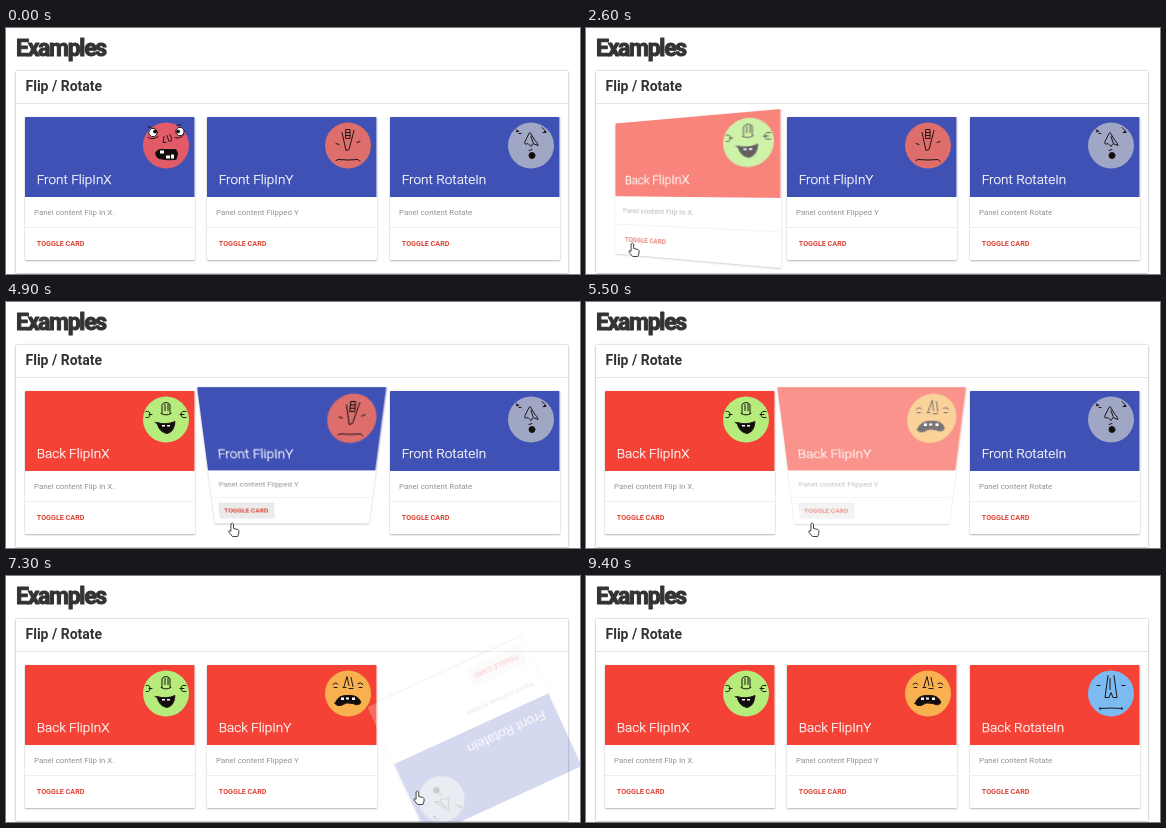
These frames come from a looping animation (574 px wide and 246 px high, 10000 ms). An HTML page:

```html
<!DOCTYPE html>
<html lang="en">
<head>
<meta charset="utf-8">
<title>Flip / Rotate</title>
<style>
  html, body { margin: 0; width: 100%; height: 100%; overflow: hidden; background: #fff; }
  body { position: relative; font-family: Roboto, sans-serif; }
  svg { position: absolute; left: 0; top: 0; overflow: visible; }
  .panel {
    position: absolute; left: 10px; top: 43px; width: 552px; height: 202px;
    background: #fff; box-shadow: 0 0 2px rgba(0,0,0,.28), 0 1px 2px rgba(0,0,0,.16);
  }
  .face {
    position: absolute; top: 89px; width: 169.5px; height: 143px;
    background: #fff; border-radius: 1px;
    box-shadow: 0 1px 2px rgba(0,0,0,.28), 0 0 1px rgba(0,0,0,.2);
  }
  .heading {
    font-weight: 700; font-size: 23px; letter-spacing: -1.3px;
    fill: #333; stroke: #333; stroke-width: 1; stroke-linejoin: round;
  }
  .subheading { font-weight: 700; font-size: 14px; fill: #333; }
  .title { font-weight: 300; font-size: 13.5px; fill: #fff; stroke: #fff; stroke-width: .25; }
  .content { font-size: 7.9px; fill: #929292; }
  .label { font-weight: 700; font-size: 7.2px; fill: #dc4538; }
  .button { fill: none; }
  .hover .button { fill: #ebebeb; }
  .ink { fill: none; stroke: #1c1416; stroke-width: 1; stroke-linecap: round; stroke-linejoin: round; }
  .ink .solid { fill: #120c0c; }
  .ink .white { fill: #fff; }
  .ink .teeth { fill: #fff; stroke: none; }
  .cursor { fill: #fff; stroke: #444; stroke-width: 1; stroke-linejoin: round; }
</style>
</head>
<body>
<div class="panel"></div>
<svg width="574" height="246">
  <text class="heading" x="10" y="28">Examples</text>
  <text class="subheading" x="19.5" y="63">Flip / Rotate</text>
  <path d="M10 75.5H562" stroke="#e5e5e5"/>
</svg>
<div id="cards"></div>
<svg width="574" height="246">
  <g id="cursor" class="cursor">
    <path id="hand" d="M-1.4 1Q0-1 1.2 1V5.5L5.6 6.5Q7 7 6.6 10L5.4 13.5H.2L-3.6 9Q-3.6 6.6 -1.4 8.2Z"/>
    <path id="arrow" d="M0 0V11L2.6 8.6 4.6 13 6.4 12.2 4.4 8H8Z"/>
  </g>
</svg>
<script>
const LOOP = 10000, STEP = 100;
const path = (d, kind = '') => `<path class="${kind}" d="${d}"/>`;
const dot = (x, y, r, kind = 'solid') => `<circle class="${kind}" cx="${x}" cy="${y}" r="${r}"/>`;

// Drawings are relative to the centre of the avatar.
const avatars = {
  shocked: dot(-13, -13, 4.2, 'white') + dot(-11, -14, 1.5) + dot(14, -14, 4.2, 'white') + dot(12, -14, 1.5)
    + path('M-18-19l3 1M11-20l4-1M-18-8q5 3 10-1M9-8q5 2 9-3M-2-9l-1 6 3 0M1-10l2 6M4-11q3 4 1 7')
    + path('M-10 7Q-9 3 0 4L10 4Q13 8 10 14Q2 15-7 13Q-11 11-10 7Z', 'solid')
    + path('M-6 5h4v3h-4zM0 10h4v3h-4zM5 9h3v4h-3z', 'teeth'),
  stern: path('M-6-13L-2 5 1 4 6-15M-2-16h4v9h-4zM-2-13h4M-2-10h4M-12-2l3 1M9-3l3-1')
    + path('M-12 15l2-1Q0 15 10 14l2 2'),
  whistling: path('M-2-12L-6-4Q-7 0-3-2L0 1 2-2 7 0Q7-2 4-5L-1-13M0-9l2 6')
    + path('M-15-16l3 2M11-18l3 3M12-13l3 0M-12-12h2M-2 5l3-1')
    + dot(-14, -14, .6) + dot(14, -14, .6) + dot(1, 10, 3),
  grinning: path('M-4-6V-15Q0-19 4-15V-6M-1-15V-9M2-15V-9M-5-6Q0-3 5-6M-20-8q4-1 4 3t-4 3M20-8q-5-1-5 3t5 3M-17-5l3 0M14-5l4 0')
    + path('M-9 3Q0 6 9 2Q8 13 1 14Q-7 13-9 3ZM-11 3l2 1', 'solid')
    + path('M-4 5.5h3v1.5h-3zM1 5.5h3v1.5h-3z', 'teeth'),
  wailing: path('M-4-7L-1-17 1-8M3-16L5-7M-5-6h3M1-5h4M-15-9q3-3 5 0M10-10q3-2 5 1M-14-6h3M11-6h3')
    + path('M-13 10Q-10 1 0 2Q10 1 13 9Q10 13 5 10Q-2 8-7 12Q-11 13-13 10Z', 'solid')
    + path('M-7 4h3v2.5h-3zM-2 4h3v2h-3zM4 4h3v2.5h-3z', 'teeth'),
  bored: path('M-3-18L-6 4H-2L0-1 2 4H6L3-18M-1-15V-4M-14-8h3M11-8h3')
    + path('M-11 15Q0 14 11 15M-11 14v2M11 14v2')
};

const flip = (axis, angle) => `perspective(225px) rotate${axis}(${angle}deg)`;
const flipOut = (axis, tilt) => [
  { transform: flip(axis, 0), opacity: 1, easing: 'ease' },
  { offset: .3, transform: flip(axis, tilt), opacity: 1, easing: 'ease' },
  { transform: flip(axis, 90), opacity: 0 }
];
const flipIn = axis => [
  { transform: flip(axis, 90), opacity: 0, easing: 'ease-in' },
  { offset: .4, transform: flip(axis, -20), easing: 'ease-in' },
  { offset: .6, transform: flip(axis, 10), opacity: 1, easing: 'ease' },
  { offset: .8, transform: flip(axis, -5), easing: 'ease' },
  { transform: flip(axis, 0), opacity: 1 }
];
const spin = (from, to) => [
  { transform: `rotate(${from}deg)`, opacity: from ? 0 : 1, easing: 'ease' },
  { transform: `rotate(${to}deg)`, opacity: to ? 0 : 1 }
];

const cards = [
  { x: 19, name: 'FlipInX', content: 'Flip In X.', start: 1867, duration: 500,
    leave: flipOut('Y', -15), enter: flipIn('Y'),
    front: ['shocked', '#e35b68'], back: ['grinning', '#b6ec7b'] },
  { x: 201, name: 'FlipInY', content: 'Flipped Y', start: 4785, duration: 500, backHover: true,
    leave: flipOut('X', -20), enter: flipIn('X'),
    front: ['stern', '#dd6e6b'], back: ['wailing', '#f9b04f'] },
  { x: 384, name: 'RotateIn', content: 'Rotate', start: 6983, duration: 667,
    leave: spin(0, 200), enter: spin(-200, 0),
    front: ['whistling', '#a0a7c5'], back: ['bored', '#7cbaf2'] }
];

const animations = [];

function addFace(card, side, color, [avatar, skin], keyframes, delay) {
  const face = document.createElement('div');
  face.className = 'face';
  face.style.left = card.x + 'px';
  face.innerHTML = `<svg width="170" height="143">
    <path d="M0 80V1Q0 0 1 0H168.5Q169.5 0 169.5 1V80Z" fill="${color}"/>
    <circle cx="141" cy="28.5" r="23" fill="${skin}"/>
    <g class="ink" transform="translate(141 28.5)">${avatars[avatar]}</g>
    <text class="title" x="11.7" y="67">${side} ${card.name}</text>
    <text class="content" x="9" y="98">Panel content ${card.content}</text>
    <path d="M0 110.5H169.5" stroke="#eee"/>
    <rect class="button" x="6" y="116.5" width="60" height="20" rx="1"/>
    <text class="label" x="11.8" y="129">TOGGLE CARD</text>
  </svg>`;
  document.getElementById('cards').append(face);
  const animation = face.animate(keyframes, { delay, duration: card.duration, fill: 'both' });
  animation.pause();
  animations.push(animation);
  return face;
}

for (const card of cards) {
  card.backFace = addFace(card, 'Back', '#f44336', card.back, card.enter, card.start + card.duration);
  card.frontFace = addFace(card, 'Front', '#3f51b5', card.front, card.leave, card.start);
}

// Pointer stops: time, x, y
const stops = [
  [0, 78, 252], [700, 78, 252], [1200, 46.5, 215], [2800, 46.5, 215], [3800, 234, 215], [4100, 226.3, 221],
  [5600, 226.3, 221], [6450, 411.5, 215], [7700, 411.5, 215], [8300, 430, 252], [LOOP, 430, 252]
];

function pointerAt(time) {
  const i = stops.findIndex(stop => stop[0] > time);
  const [t0, x0, y0] = stops[i - 1], [t1, x1, y1] = stops[i];
  const p = (time - t0) / (t1 - t0), eased = p * p * (3 - 2 * p);
  return [x0 + (x1 - x0) * eased, y0 + (y1 - y0) * eased];
}

const cursor = document.getElementById('cursor');
const hand = document.getElementById('hand');
const arrow = document.getElementById('arrow');

function draw(time) {
  for (const animation of animations) animation.currentTime = time;
  const [x, y] = pointerAt(time);
  let overButton = false;
  for (const card of cards) {
    const over = x > card.x + 6 && x < card.x + 66 && y > 205 && y < 226;
    card.frontFace.classList.toggle('hover', over);
    card.backFace.classList.toggle('hover', over && !!card.backHover);
    overButton = overButton || over;
  }
  cursor.setAttribute('transform', `translate(${x} ${y})`);
  hand.style.display = overButton ? '' : 'none';
  arrow.style.display = overButton ? 'none' : '';
}

const start = performance.now();
function tick() {
  const time = (performance.now() - start) % LOOP;
  draw(Math.floor(time / STEP) * STEP);
  requestAnimationFrame(tick);
}
tick();
</script>
</body>
</html>
```
